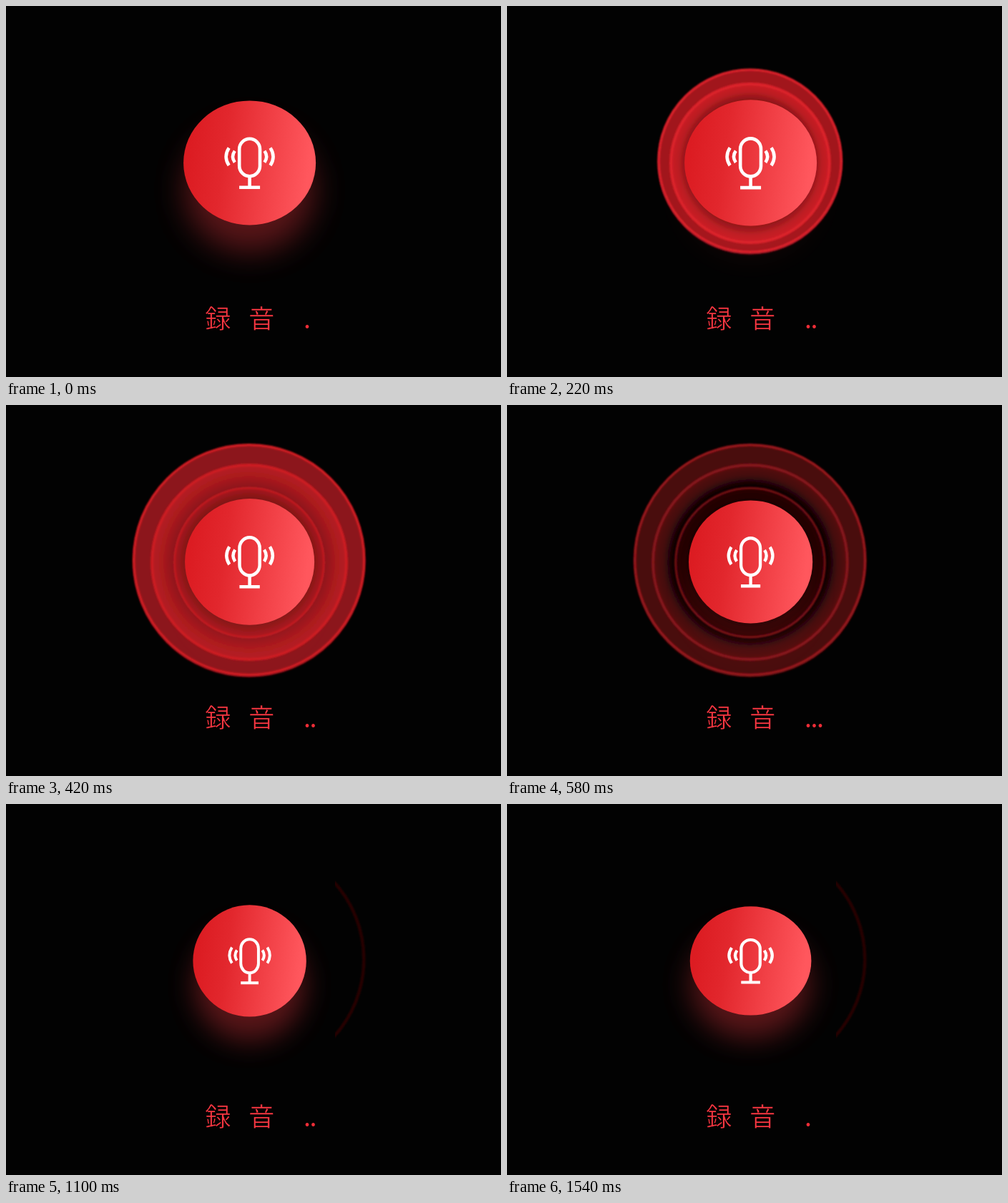
An HTML page for the animation above (1.56 s loop, 692 by 519 pixels).

```html
<!DOCTYPE html>
<html lang="ja">
<head>
<meta charset="utf-8">
<title>録音</title>
<style>
html, body { margin: 0; width: 100%; height: 100%; overflow: hidden; background: #020202; }
svg { display: block; width: 692px; height: 519px; }
text { font-family: "Noto Sans CJK JP", "Noto Sans CJK", sans-serif; fill: #fb3742; }
#label { font-size: 36.5px; font-weight: 300; stroke: #020202; stroke-width: .6px; }
#dots { font-size: 36px; fill: #ee2d37; }
</style>
</head>
<body>
<svg viewBox="0 0 692 519">
  <defs>
    <linearGradient id="red" x1="0" y1=".42" x2="1" y2=".54">
      <stop offset="0.04" stop-color="#dc1c22"/>
      <stop offset="0.3" stop-color="#e2272d"/>
      <stop offset="0.95" stop-color="#ff575d"/>
    </linearGradient>
    <radialGradient id="midFill" gradientUnits="userSpaceOnUse" cx="340" cy="220" r="136">
      <stop/><stop/><stop offset="1"/>
    </radialGradient>
    <radialGradient id="inFill" gradientUnits="userSpaceOnUse" cx="340" cy="220" r="105">
      <stop offset=".84"/><stop offset="1"/>
    </radialGradient>
    <filter id="blur" x="-50%" y="-50%" width="200%" height="200%"><feGaussianBlur stdDeviation="22"/></filter>
    <filter id="soft" x="-10%" y="-10%" width="120%" height="120%"><feGaussianBlur stdDeviation="0.8"/></filter>
    <clipPath id="side"><rect x="460" y="0" width="232" height="519"/></clipPath>
  </defs>
  <rect width="692" height="519" fill="#020202"/>
  <g id="rings">
    <circle id="edge" cx="339.7" cy="218.5" filter="url(#soft)"/>
    <circle id="outer" cx="339.7" cy="216.7" stroke-width="3.4" filter="url(#soft)"/>
    <circle id="mid" cx="340" cy="220" fill="url(#midFill)" stroke-width="3.8" filter="url(#soft)"/>
    <circle id="inner" cx="340" cy="220.5" fill="url(#inFill)" stroke-width="2.4" filter="url(#soft)"/>
  </g>
  <g id="trace" clip-path="url(#side)">
    <circle cx="339.7" cy="217.2" r="160.6" fill="none" stroke="#260406" stroke-width="4.4" filter="url(#soft)"/>
  </g>
  <g id="button">
    <ellipse id="glow" cy="38" rx="90" ry="86" fill="#f0383f" filter="url(#blur)"/>
    <ellipse rx="92.5" ry="87" fill="url(#red)"/>
    <g fill="none" stroke="#fff" stroke-width="4.6">
      <rect x="-14.4" y="-33.6" width="28.8" height="52.4" rx="14.4"/>
      <path d="M0 19V34.5M-14.5 34.3H14.5"/>
      <path id="waves" d="M-20.8 -16.6Q-26.4 -8.6 -20.8 -0.6M-28.9 -20.9Q-37 -8.6 -28.9 3.7"/>
      <use href="#waves" transform="scale(-1 1)"/>
    </g>
  </g>
  <text id="label" y="451.3"><tspan x="278">録</tspan><tspan x="339">音</tspan></text>
  <text id="dots" y="450.6" text-anchor="middle"></text>
</svg>
<script>
const LOOP = 1560, STEP = 20, HOLD = 40, RING_END = 740;
const $ = id => document.getElementById(id);
const set = (el, attrs) => { for (const k in attrs) el.setAttribute(k, attrs[k]); };

const poseTimes = [0, 220, 420, 580, 760, 1100, 1540];
const halfWidth = [92.5, 92.5, 90.5, 86.6, 83.5, 79.2, 84.8];
const halfHeight = [87, 88.1, 88.4, 86, 82.2, 78.2, 76.2];

const ringTimes = [0, 220, 420, 580, RING_END];
const radii = {
  outer: [80, 127.6, 161, 161, 161],
  mid: [79, 111, 136, 136, 136],
  inner: [70, 85, 104.5, 104.5, 104.5]
};
const glowLevel = [1, .25, .25, .3, 1];
const tones = {
  edge: ["#8a1418", "#74101a", "#6a0e13", "#3c080b", "#020202"],
  outer: ["#b81c22", "#a1191e", "#8c141a", "#4a0b0e", "#020202"],
  outerLine: ["#e0222b", "#d9202a", "#d01c23", "#96151b", "#260406"],
  midFar: ["#d82229", "#cb2026", "#b51c21", "#580d11", "#020202"],
  midNear: ["#9c181c", "#8e1519", "#8f151a", "#080102", "#020202"],
  midLine: ["#e8242c", "#dc2229", "#cc1b21", "#86131a", "#020202"],
  inFar: ["#b81c22", "#b01b20", "#a8181d", "#2a0507", "#020202"],
  inNear: ["#9a171c", "#8c1519", "#7c1216", "#1e0304", "#020202"],
  inLine: ["#d82028", "#d01e26", "#c41a20", "#7a1015", "#020202"]
};

function segment(times, t) {
  let i = 0;
  while (i < times.length - 2 && t >= times[i + 1]) i++;
  return [i, Math.min(1, (t - times[i]) / (times[i + 1] - times[i]))];
}

function linear(times, vals, t) {
  const [i, u] = segment(times, t);
  return vals[i] + (vals[i + 1] - vals[i]) * u;
}

// Hermite curve with finite-difference tangents
function smooth(times, vals, t) {
  const [i, u] = segment(times, t), last = vals.length - 1;
  const slope = k => {
    const a = Math.max(0, k - 1), b = Math.min(last, k + 1);
    return (vals[b] - vals[a]) / (times[b] - times[a]);
  };
  const d = times[i + 1] - times[i], v = 1 - u;
  return vals[i] * (1 + 2 * u) * v * v + vals[i + 1] * u * u * (3 - 2 * u)
    + d * u * v * (slope(i) * v - slope(i + 1) * u);
}

const rgb = hex => [1, 3, 5].map(k => parseInt(hex.slice(k, k + 2), 16));
const css = c => `rgb(${c.map(Math.round)})`;
const mix = (a, b, u) => a.map((v, k) => v + (b[k] - v) * u);

function tone(name, t) {
  const [i, u] = segment(ringTimes, t);
  return mix(rgb(tones[name][i]), rgb(tones[name][i + 1]), u);
}

function drawRings(t) {
  const r = {};
  for (const k in radii) r[k] = linear(ringTimes, radii[k], t);
  const col = name => css(tone(name, t));
  set($("edge"), { r: r.outer + 1.6, fill: col("edge") });
  set($("outer"), { r: r.outer, fill: col("outer"), stroke: col("outerLine") });
  set($("mid"), { r: r.mid, stroke: col("midLine") });
  set($("inner"), { r: r.inner, stroke: col("inLine") });

  // The shade starts at the inner ring, or at the button while that ring is hidden
  const near = tone("midNear", t), far = tone("midFar", t);
  const start = Math.min(.98, Math.max(90, r.inner + 2) / r.mid);
  const [a, b, c] = $("midFill").children;
  set($("midFill"), { r: r.mid });
  set(a, { offset: start, "stop-color": css(near) });
  set(b, { offset: start + (1 - start) * .5, "stop-color": css(mix(near, far, .72)) });
  set(c, { "stop-color": css(far) });

  const [d, e] = $("inFill").children;
  set($("inFill"), { r: r.inner });
  set(d, { "stop-color": col("inNear") });
  set(e, { "stop-color": col("inFar") });
}

function dotCount(t) {
  const n = Math.floor(t / 212);
  return Math.max(1, 4 - Math.abs(3 - n));
}

function draw(t) {
  const ringsOn = t < RING_END;
  $("rings").style.display = ringsOn ? "" : "none";
  $("trace").style.display = ringsOn ? "none" : "";
  if (ringsOn) drawRings(t);

  const sx = smooth(poseTimes, halfWidth, t) / 92.5;
  const sy = smooth(poseTimes, halfHeight, t) / 87;
  set($("button"), { transform: `translate(340.6 219.4) scale(${sx} ${sy})` });
  set($("glow"), { opacity: .37 * linear(ringTimes, glowLevel, t) });

  let dots = "";
  for (let i = 0; i < dotCount(t); i++) dots += `<tspan x="${421 + i * 8.5}">.</tspan>`;
  if ($("dots").innerHTML !== dots) $("dots").innerHTML = dots;
}

const begin = performance.now();
function tick() {
  const t = (performance.now() - begin) % LOOP;
  draw(t < HOLD ? 0 : Math.floor(t / STEP) * STEP);
  requestAnimationFrame(tick);
}
tick();
</script>
</body>
</html>
```
